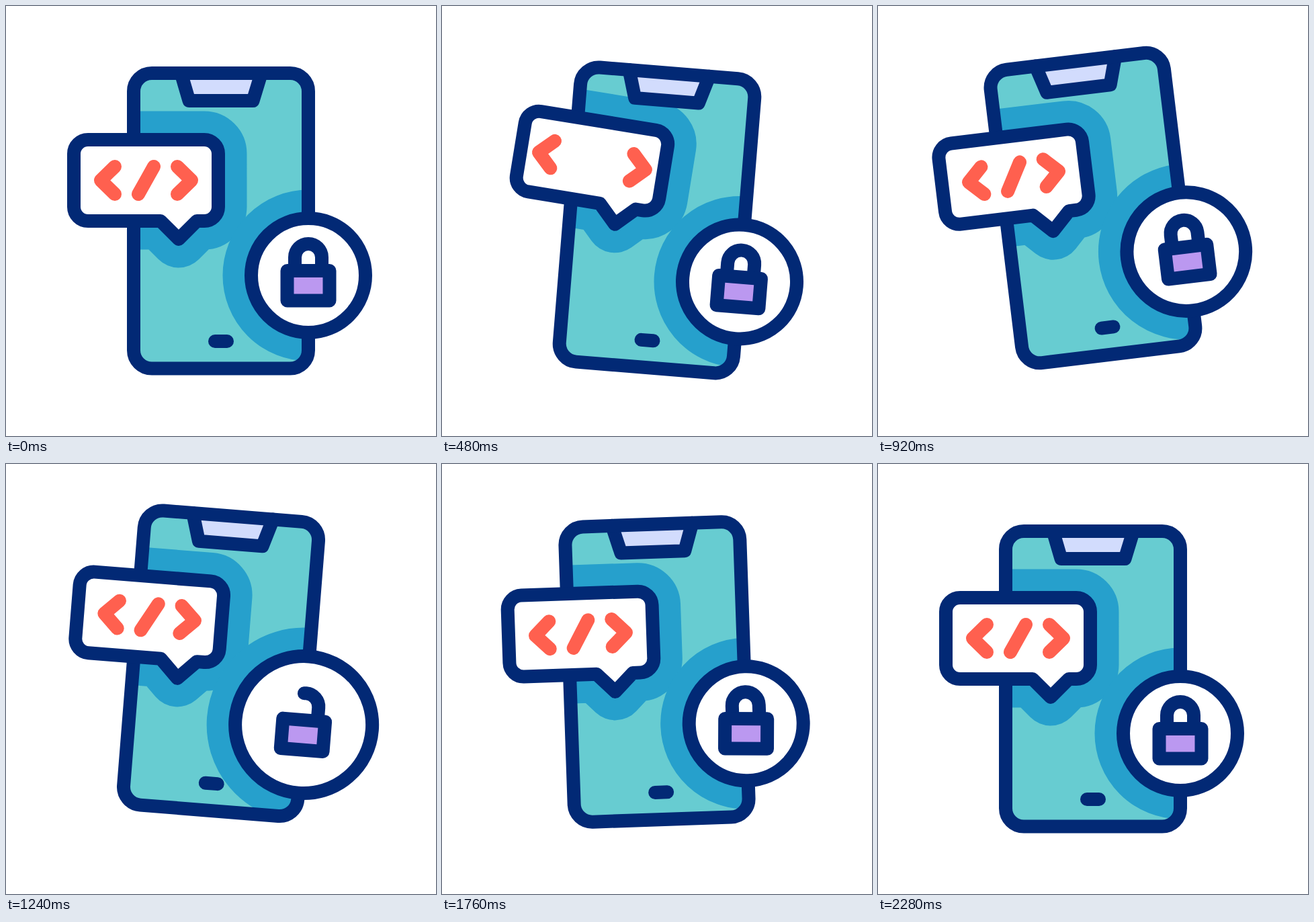
Recreate the animation shown at these times as an HTML page. Size 640 px wide and 640 px high, loop 2.32 s.

```html
<!DOCTYPE html>
<html lang="en">
<head>
<meta charset="utf-8">
<title>Secure app</title>
<style>
  html, body { margin: 0; width: 100%; height: 100%; overflow: hidden; background: #fff; }
  svg { display: block; width: 100%; height: 100%; }
  .line { fill: none; stroke: #022975; stroke-width: 20; stroke-linecap: round; stroke-linejoin: round; }
  .white { fill: #fff; }
  .halo { fill: #26a0cc; stroke: #26a0cc; stroke-width: 85; stroke-linejoin: round; }
  .code { stroke: #ff604f; }
</style>
</head>
<body>
<svg viewBox="0 0 640 640">
  <defs>
    <rect id="body" x="190" y="100" width="260" height="439.5" rx="27"/>
    <path id="balloon" d="M122 199H295a21 21 0 0 1 21 21V299a21 21 0 0 1 -21 21H284L257 347L230 320H122a21 21 0 0 1 -21 -21V220a21 21 0 0 1 21 -21Z"/>
    <clipPath id="screen"><use href="#body"/></clipPath>
  </defs>
  <g id="phone">
    <use href="#body" fill="#67ccd1"/>
    <g clip-path="url(#screen)">
      <use href="#balloon" id="bubbleHalo" class="halo"/>
      <circle id="ringHalo" class="halo" cx="450" cy="401" r="85"/>
    </g>
    <path class="line" style="fill:#d2dcfd" d="M260.5 100L272.5 141H367.5L380 100"/>
    <use href="#body" class="line"/>
    <path class="line" d="M311 499H329"/>
    <g id="bubble">
      <use href="#balloon" class="line white"/>
      <path id="open" class="line code" d="M162 239L141 259.5L162 280"/>
      <path id="slash" class="line code" pathLength="1" d="M197 280L220 239"/>
      <path id="close" class="line code" d="M255 239L276 259.5L255 280"/>
    </g>
    <circle id="ring" class="line white" cx="450" cy="401" r="85"/>
    <path id="shackle" class="line" pathLength="1" d="M470 394V374a20 20 0 0 0 -40 0V394"/>
    <rect id="lock" class="line" style="fill:#bb98f0" x="418.5" y="394" width="63" height="44.5"/>
  </g>
</svg>
<script>
const LOOP = 2320, STEP = 40;
const el = id => document.getElementById(id);
const set = (id, name, value) => el(id).setAttribute(name, value);
const turn = (id, angle, x, y) => set(id, "transform", `rotate(${angle} ${x} ${y})`);
const shift = (id, x) => set(id, "transform", `translate(${x} 0)`);

// Smooth rise from 0 to 1 between times a and b.
function ease(t, a, b) {
  const u = Math.min(1, Math.max(0, (t - a) / (b - a)));
  return u * u * (3 - 2 * u);
}

// Rise from a to b, hold, fall back from c to d.
const pulse = (t, a, b, c, d) => ease(t, a, b) - ease(t, c, d);

// Swing through evenly timed peaks and come to rest at 0.
function sway(t, start, step, ...peaks) {
  let value = 0;
  [...peaks, 0].forEach((peak, i) => {
    const from = start + i * step;
    value += (peak - (peaks[i - 1] || 0)) * ease(t, from, from + step);
  });
  return value;
}

function trim(id, part) {
  set(id, "stroke-dasharray", part < 1 ? `${part} 2` : "none");
  set(id, "visibility", part > 0 ? "visible" : "hidden");
}

function draw(t) {
  const lift = -23 * pulse(t, 400, 1100, 1340, 2124);
  const tilt = sway(t, 315, 330, 9.3, -8.2, 6, -2.9);
  set("phone", "transform", `translate(0 ${lift}) rotate(${tilt} 320 320)`);

  const swing = sway(t, 10, 235, -6.2, 4.6);
  turn("bubble", swing, 460, 350);
  turn("bubbleHalo", swing, 460, 350);

  const apart = pulse(t, 100, 320, 560, 800);
  shift("open", -13 * apart);
  shift("close", 13 * apart);
  trim("slash", 1 - apart);

  const radius = 85 + 17 * pulse(t, 840, 1120, 1340, 1610);
  set("ring", "r", radius);
  set("ringHalo", "r", radius);
  trim("shackle", 1 - 0.47 * pulse(t, 960, 1160, 1340, 1520));
  turn("lock", sway(t, 1320, 250, -5.3, 3.5), 450, 400);
}

const start = performance.now();
function frame() {
  const t = (performance.now() - start) % LOOP;
  draw(Math.floor(t / STEP) * STEP);
  requestAnimationFrame(frame);
}
frame();
</script>
</body>
</html>
```
